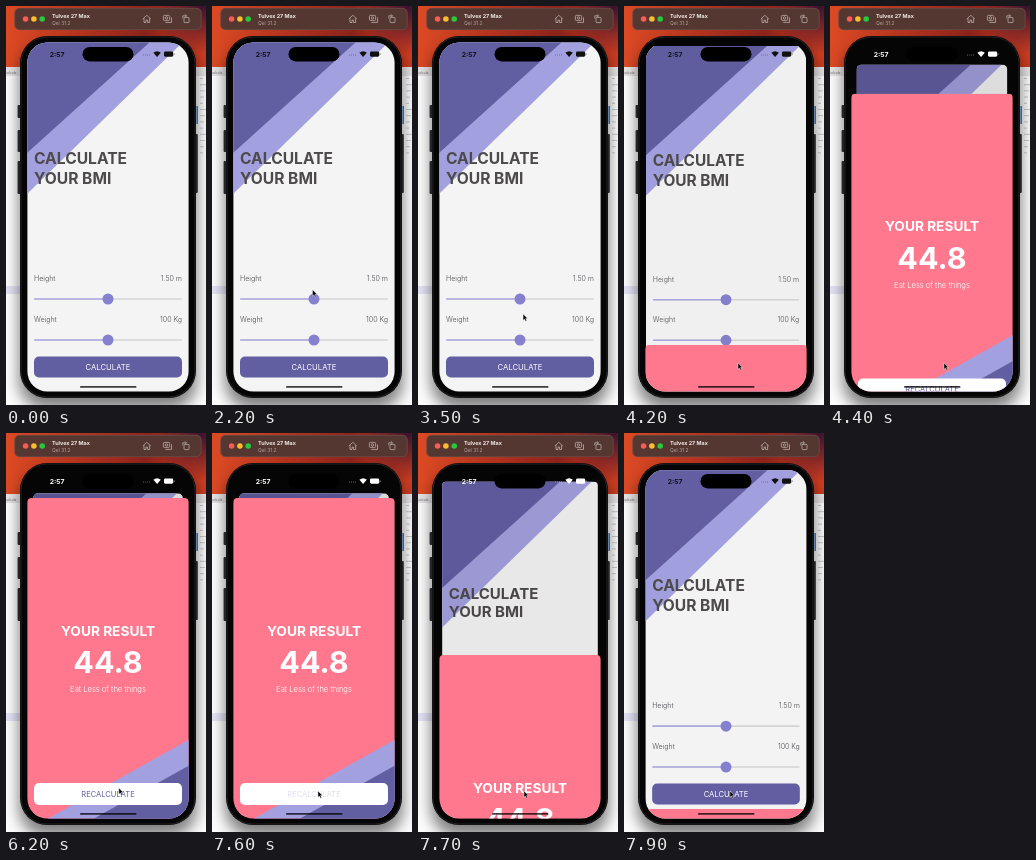
An HTML page that plays this animation: 200x399 px, repeating every 8 s.

```html
<!DOCTYPE html>
<html lang="en">
<head>
<meta charset="utf-8">
<title>BMI calculator</title>
<style>
  html, body { margin: 0; width: 100%; height: 100%; overflow: hidden; background: #fff; }
  svg { display: block; width: 200px; height: 399px; }
  text { font-family: Inter, Roboto, sans-serif; }
  .bold { font-weight: 700; }
  .light { font-weight: 300; }
  .mid { text-anchor: middle; }
  .end { text-anchor: end; }
  .label { font-size: 7.05px; fill: #4e4b50; }
  .line { fill: none; stroke: #c9bdb9; stroke-width: .7; }
</style>
</head>
<body>
<svg viewBox="0 0 200 399" xmlns="http://www.w3.org/2000/svg">
  <defs>
    <linearGradient id="wall">
      <stop offset="0" stop-color="#dc4a24"/>
      <stop offset=".35" stop-color="#b8351f"/>
      <stop offset=".7" stop-color="#8e231c"/>
      <stop offset="1" stop-color="#cc3d20"/>
    </linearGradient>
    <radialGradient id="dusk" gradientUnits="userSpaceOnUse" cx="196" cy="0" r="48">
      <stop offset="0" stop-color="#3a1230"/>
      <stop offset="1" stop-color="#3a1230" stop-opacity="0"/>
    </radialGradient>
    <filter id="blur" x="-20%" y="-20%" width="140%" height="140%"><feGaussianBlur stdDeviation="7.5"/></filter>
    <clipPath id="screen"><rect x="21.4" y="36.6" width="161.2" height="349" rx="20"/></clipPath>
    <clipPath id="cardClip"><rect id="cardShape" x="21" y="36.5" width="162" height="350"/></clipPath>
    <clipPath id="sheetClip"><path d="M21 390V70q0-5 5-5H178q5 0 5 5V390z"/></clipPath>
  </defs>

  <!-- desktop -->
  <rect width="200" height="399" fill="#fdfdfd"/>
  <rect width="200" height="61" fill="url(#wall)"/>
  <rect width="200" height="61" fill="url(#dusk)"/>
  <rect y="61" width="200" height="9" fill="#e6e3e4"/>
  <text x="-1" y="68" font-size="3.4" fill="#77757a">calcula</text>
  <rect y="280" width="14" height="8" fill="#e4e4f6"/>
  <rect x="190.4" y="100" width="1.6" height="18" fill="#3b82d8"/>
  <g id="notes" fill="#c9c9cd"></g>
  <rect x="13" y="41" width="178" height="362" rx="27" filter="url(#blur)" opacity=".5"/>

  <!-- window bar -->
  <rect x="8.5" y="2" width="187" height="22" rx="5" fill="#543730"/>
  <rect x="8.8" y="2.3" width="186.4" height="21.4" rx="4.8" fill="none" stroke="#7b5b53" stroke-width=".5"/>
  <circle cx="19.6" cy="13" r="2.8" fill="#fc5b54"/>
  <circle cx="27.9" cy="13" r="2.8" fill="#f9bd2e"/>
  <circle cx="36.2" cy="13" r="2.8" fill="#2ac640"/>
  <text x="46" y="12.2" class="bold" font-size="5.4" fill="#f1e9e7">Tulvex 27 Max</text>
  <text x="46" y="18.6" font-size="4.9" fill="#b5a5a1">Qel 31.2</text>
  <g class="line">
    <path d="M136.8 13l4-3.7 4 3.7M138 12.2v4.3h2v-2.4h1.6v2.4h2v-4.3"/>
    <rect x="157.4" y="9.4" width="6.2" height="5" rx="1"/>
    <path d="M159.3 16.4h6.2v-5"/>
    <circle cx="160.5" cy="11.9" r="1.2"/>
    <rect x="178" y="11.4" width="5" height="5.2" rx=".8"/>
    <path d="M176.8 12.4v-2.6h3.4M179 8.3l1.5 1.5-1.5 1.5"/>
  </g>

  <!-- phone body -->
  <g fill="#242426">
    <rect x="11.6" y="99" width="3" height="13" rx="1"/>
    <rect x="11.6" y="124" width="3" height="22" rx="1"/>
    <rect x="11.6" y="155" width="3" height="33" rx="1"/>
    <rect x="189.4" y="128" width="2.4" height="59" rx="1"/>
  </g>
  <rect x="14" y="30" width="176" height="362" rx="27" fill="#050505"/>
  <rect x="15" y="31" width="174" height="360" rx="26" fill="none" stroke="#343235" stroke-width=".7"/>

  <g clip-path="url(#screen)">
    <!-- form -->
    <g id="card"><g clip-path="url(#cardClip)">
      <rect x="21" y="36" width="162" height="351" fill="#f4f4f4"/>
      <path d="M21 36H177L21 188z" fill="#a3a0df"/>
      <path d="M21 36H144L21 147z" fill="#625ea2"/>
      <g class="bold" font-size="15.6" fill="#4d4a4b">
        <text x="28" y="158">CALCULATE</text>
        <text x="28" y="177.6">YOUR BMI</text>
      </g>
      <g id="sliders"></g>
      <rect x="28" y="350.5" width="148" height="21" rx="5" fill="#625ea2"/>
      <text id="calc" x="102" y="363.8" class="mid" font-size="7.7" fill="#fff">CALCULATE</text>
      <rect id="shade" x="21" y="36" width="162" height="351"/>
    </g></g>

    <!-- result -->
    <g id="sheet"><g clip-path="url(#sheetClip)">
      <rect x="21" y="65" width="162" height="325" fill="#ff788d"/>
      <path d="M183 306.5V390H34z" fill="#a3a0df"/>
      <path d="M183 332.5V390H80z" fill="#625ea2"/>
      <g class="mid" fill="#fff">
        <text x="102" y="202.6" class="bold" font-size="13.7">YOUR RESULT</text>
        <text x="102" y="240" class="bold" font-size="30.5">44.8</text>
        <text x="102" y="259.4" class="light" font-size="7.6">Eat Less of the things</text>
      </g>
      <rect x="28" y="350" width="148" height="22" rx="5" fill="#fff"/>
      <text id="again" x="102" y="363.8" class="mid" font-size="7.55" fill="#625ea2">RECALCULATE</text>
    </g></g>
    <rect x="74" y="380" width="56.5" height="1.8" rx=".9" opacity=".75"/>
  </g>

  <!-- status bar -->
  <rect x="76.5" y="41" width="51" height="14.4" rx="7.2" fill="#000"/>
  <g id="status">
    <text x="43.8" y="50.6" class="bold" font-size="6.8">2:57</text>
    <path d="M137 49h1m1 0h1m1 0h1m1 0h1" stroke="currentColor" stroke-width="1" opacity=".35"/>
    <path d="M147.4 46.8q3.7-3.3 7.4 0L151.1 51z"/>
    <rect x="158" y="45.5" width="9.2" height="5.2" rx="1.4"/>
    <rect x="167.8" y="47.2" width=".7" height="1.8" rx=".3" opacity=".6"/>
  </g>

  <path id="cursor" d="M0 0V6.3L1.5 5 2.5 7.2 3.6 6.7 2.6 4.5H4.5z" fill="#000" stroke="#fff" stroke-width=".4"/>
</svg>

<script>
const LOOP = 8000, STEP = 100;
const OPEN = 4163, CLOSE = 7610;
const $ = id => document.getElementById(id);

$('sliders').innerHTML = [['Height', '1.50 m', 293], ['Weight', '100 Kg', 334]].map(([name, value, y]) => `
  <text x="28" y="${y - 18}" class="label light">${name}</text>
  <text x="176" y="${y - 18}" class="label light end">${value}</text>
  <rect x="28" y="${y - 0.8}" width="148" height="1.6" rx=".8" fill="#d6d5d8"/>
  <rect x="28" y="${y - 0.8}" width="74" height="1.6" rx=".8" fill="#aeabe2"/>
  <circle cx="102" cy="${y}" r="5.5" fill="#8581ce"/>`).join('');

$('notes').innerHTML = Array.from({ length: 13 }, (_, i) =>
  `<rect x="194" y="${72 + i * 6.2}" width="${3 + i * 7 % 4}" height="1"/>`).join('');

// time, x, y of the pointer tip
const path = [
  [2200, 100.5, 283.8], [2800, 100.5, 283.8], [3100, 101.5, 287], [3300, 102, 291],
  [3900, 114, 357], [4800, 114, 357], [5000, 112.8, 355], [6500, 112.8, 355], [6900, 106, 358]
];

function pointer(t) {
  const i = path.findIndex(p => p[0] > t);
  if (i < 0) return path[path.length - 1].slice(1);
  const [t0, x0, y0] = path[i - 1], [t1, x1, y1] = path[i];
  const k = (t - t0) / (t1 - t0), e = k * k * (3 - 2 * k);
  return [x0 + (x1 - x0) * e, y0 + (y1 - y0) * e];
}

// critically damped spring from 0 to 1
function spring(ms) {
  const x = Math.max(0, ms) * 0.01826;
  return 1 - (1 + x) * Math.exp(-x);
}

function draw(t) {
  const p = spring(t - OPEN) - spring(t - CLOSE);
  const top = 386 - 321 * p, scale = 1 - 0.075 * p;

  $('sheet').setAttribute('transform', `translate(0 ${top - 65})`);
  $('sheet').style.display = p > 0 ? '' : 'none';
  $('card').setAttribute('transform',
    `translate(102 ${37 + 24 * p}) scale(${scale}) translate(-102 -37)`);
  $('cardShape').setAttribute('rx', Math.min(5, 8 * p));
  $('shade').setAttribute('opacity', 0.1 * p);

  const ink = p > 0.5 ? '#fff' : '#111';
  $('status').setAttribute('fill', ink);
  $('status').style.color = ink;

  $('calc').setAttribute('opacity', t >= 4100 && t < 4300 ? 0.3 : 1);
  $('again').setAttribute('opacity', t >= 7600 ? 0.2 : 1);

  const shown = t >= path[0][0];
  $('cursor').style.display = shown ? '' : 'none';
  if (shown) $('cursor').setAttribute('transform', `translate(${pointer(t)})`);
}

const start = performance.now();
function tick() {
  const t = (performance.now() - start) % LOOP;
  draw(Math.floor(t / STEP) * STEP);
  requestAnimationFrame(tick);
}
tick();
</script>
</body>
</html>
```
